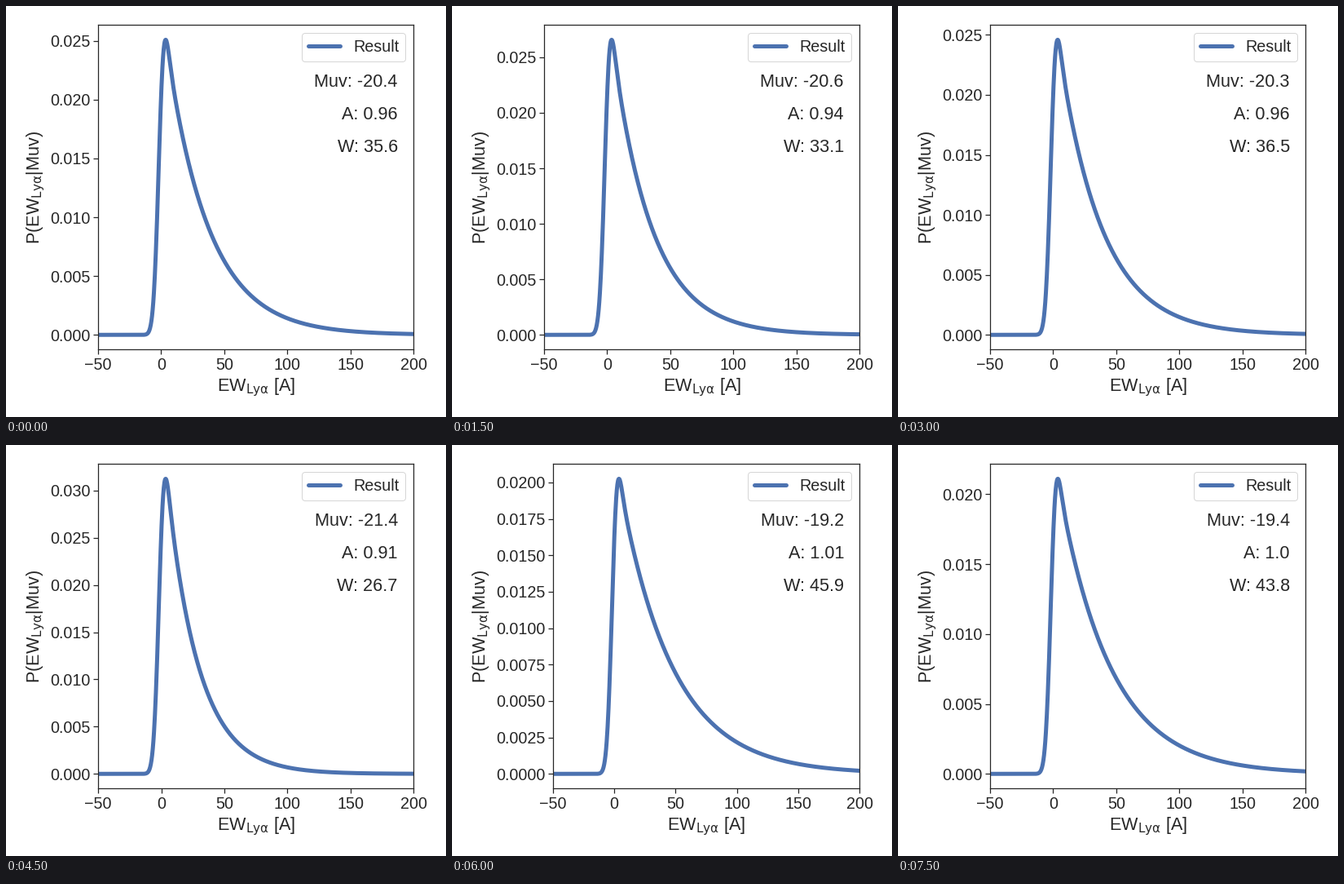
A matplotlib script for the animation above (8000 ms loop, 540x504 px).

```python
import math

import matplotlib.pyplot as plt
import numpy as np
from matplotlib.animation import FuncAnimation

DARK = "0.15"
BLUE = "#4C72B0"
BASE = 21.6
SMALL = 19.8

plt.rcParams.update({
    "font.family": ["Liberation Sans", "DejaVu Sans"],
    "font.size": BASE,
    "mathtext.fontset": "dejavusans",
    "text.color": DARK,
    "axes.labelcolor": DARK,
    "axes.edgecolor": DARK,
    "axes.linewidth": 1.25,
    "xtick.color": DARK,
    "ytick.color": DARK,
    "lines.solid_capstyle": "round",
})

WIDTHS = [35.6, 33.1, 36.5, 26.7, 45.9, 43.8]
STEP = 500
HOLD = 3
FRAMES = 16
SIGMA = 3.6

erf = np.vectorize(math.erf)
x = np.linspace(-50, 200, 1001)


def magnitude(width):
    return (width - 212.72) / 8.7


def amplitude(width):
    return 0.7668 + 0.0053 * width


def profile(width):
    """Exponential decay plus a spike at zero, both blurred by a Gaussian."""
    w = 0.94 * width
    spike = 0.1195 - 0.00142 * width
    z = x / SIGMA
    gauss = np.exp(-z ** 2 / 2) / (SIGMA * math.sqrt(2 * math.pi))
    rise = (1 + erf((z - SIGMA / w) / math.sqrt(2))) / 2
    decay = np.exp(SIGMA ** 2 / (2 * w ** 2) - x / w) / w * rise
    return (1 - spike) * decay + spike * gauss


fig, ax = plt.subplots(figsize=(7.5, 7), dpi=72)


def draw(i):
    width = WIDTHS[i // HOLD]
    ax.clear()
    ax.plot(x, profile(width), color=BLUE, lw=5, label="Result")
    ax.set_xlim(-50, 200)
    ax.tick_params(length=6, width=1.25, pad=3.5, labelsize=SMALL)
    name = r"EW$_{\mathrm{Ly\alpha}}$"
    ax.set_xlabel(f"{name} [A]", fontsize=BASE)
    ax.set_ylabel(f"P({name}|Muv)", fontsize=BASE)
    ax.legend(loc="upper right", fontsize=SMALL, framealpha=0.8,
              edgecolor="0.8")
    notes = (f"Muv: {round(magnitude(width), 1)}",
             f"A: {round(amplitude(width), 2)}",
             f"W: {width}")
    for k, note in enumerate(notes):
        ax.text(0.95, 0.85 - 0.1 * k, note, transform=ax.transAxes,
                ha="right", va="top")
    fig.tight_layout()
    return ax.get_children()


anim = FuncAnimation(fig, draw, frames=FRAMES, init_func=lambda: draw(0),
                     interval=STEP, repeat=True, repeat_delay=0, blit=False)
plt.show()
```
